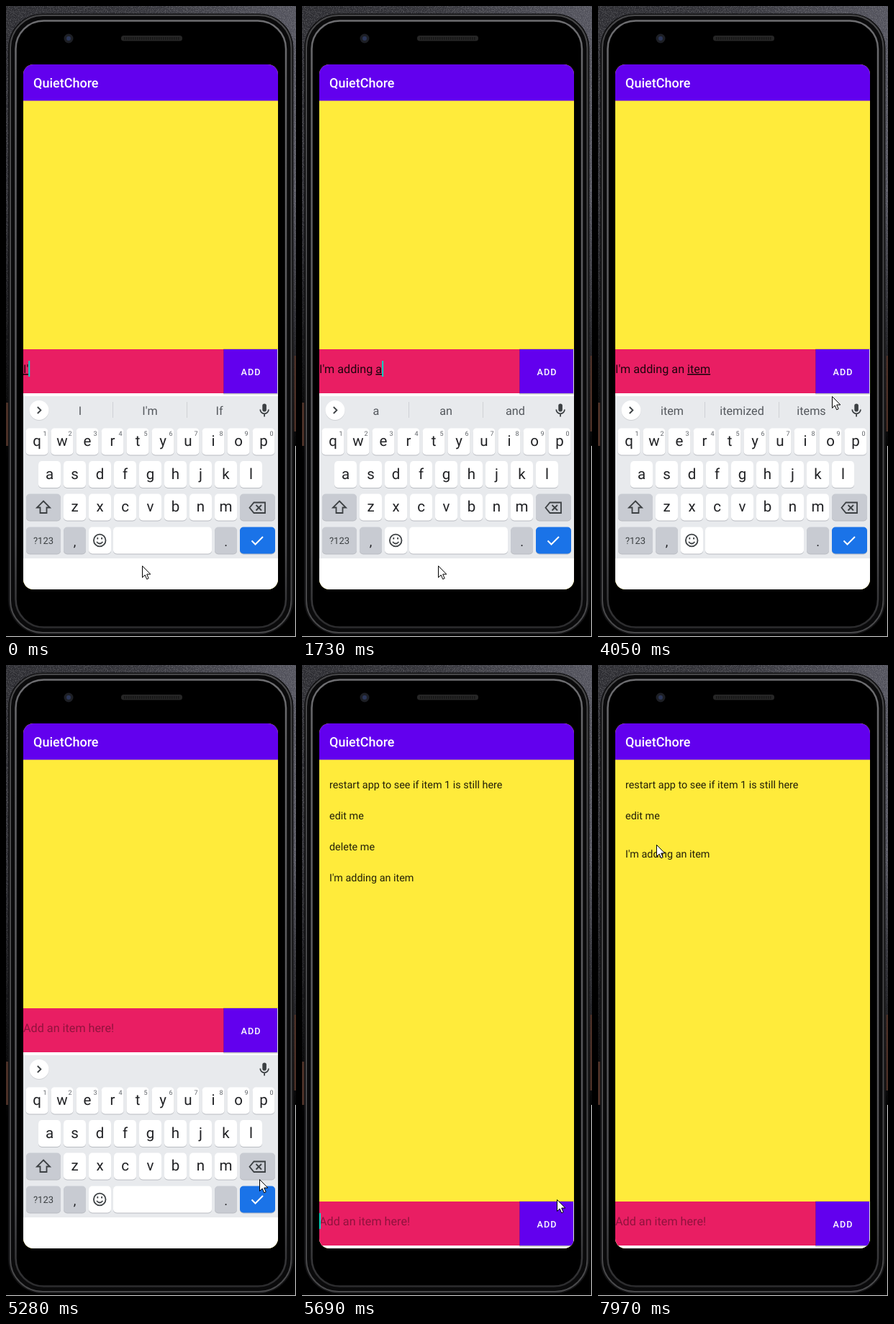
An HTML page that plays this animation: 403x875 px, repeating every 8 s.

```html
<!DOCTYPE html>
<html lang="en">
<head>
<meta charset="utf-8">
<title>To-do app</title>
<style>
  html, body { margin: 0; width: 100%; height: 100%; overflow: hidden; background: #000; }
  svg { display: block; font-family: Roboto, sans-serif; text-rendering: geometricPrecision; }
  text { white-space: pre; }
  .mid { text-anchor: middle; }
  .line { fill: none; stroke: #3c4043; stroke-width: 1.8; }
</style>
</head>
<body>
<svg width="403" height="875" viewBox="0 0 403 875">
  <defs>
    <linearGradient id="desk"><stop stop-color="#2b2b30"/><stop offset=".4" stop-color="#303036"/><stop offset="1" stop-color="#52525c"/></linearGradient>
    <linearGradient id="fade" x2="0" y2="1"><stop offset=".3" stop-opacity="0"/><stop offset=".72"/></linearGradient>
    <linearGradient id="metal" x2="0" y2="1"><stop stop-color="#6e6e71"/><stop offset=".1" stop-color="#646467"/><stop offset=".85" stop-color="#505053"/><stop offset="1" stop-color="#2c2c2e"/></linearGradient>
    <filter id="grain" x="0" y="0" width="1" height="1" color-interpolation-filters="sRGB">
      <feTurbulence type="fractalNoise" baseFrequency=".8" numOctaves="2" seed="4"/>
      <feColorMatrix values="0 0 0 0 1  0 0 0 0 1  0 0 0 0 1  .6 0 0 0 -.26"/>
    </filter>
    <clipPath id="screen"><rect x="24" y="81" width="354" height="728" rx="14"/></clipPath>
  </defs>

  <rect width="403" height="875" fill="url(#desk)"/>
  <rect width="403" height="875" filter="url(#grain)"/>
  <rect width="403" height="875" fill="url(#fade)"/>
  <path d="M1.5 550V610M402 485V590" stroke="#4a2f26" stroke-width="3"/>
  <path d="M402.5 610V874.5H0" fill="none" stroke="#d8d8d8"/>
  <rect x="3.5" y="11" width="395.5" height="860" rx="47" fill="#0a0a0b" stroke="#19191b"/>
  <rect x="6" y="13" width="390.5" height="856" rx="45" fill="none" stroke="#48484a" stroke-width="2"/>
  <rect x="13.5" y="20.5" width="375.5" height="841" rx="39" fill="#000" stroke="url(#metal)" stroke-width="2.5"/>
  <circle cx="87" cy="45" r="6.5" fill="#1d1f25"/>
  <circle cx="87" cy="45" r="3" fill="#2b3658"/>
  <rect x="160" y="41" width="85" height="7.5" rx="3.5" fill="#262626"/>
  <path d="M164 45H242" stroke="#161616" stroke-width="4" stroke-dasharray="1.5 1.5"/>

  <g clip-path="url(#screen)">
    <rect x="24" y="81" width="354" height="728" fill="#ffeb3b"/>
    <rect x="24" y="81" width="354" height="50.4" fill="#6200ee"/>
    <text x="38" y="113" font-size="18" font-weight="500" fill="#fff">QuietChore</text>
    <g id="list" font-size="14.4" fill="#000" fill-opacity=".87"></g>
    <g id="bar">
      <rect x="24" y="476" width="354" height="75" fill="#fff"/>
      <rect x="24" y="476" width="279" height="61" fill="#e91e63"/>
      <rect x="302" y="475.5" width="75.5" height="63" fill-opacity=".25"/>
      <rect x="302.5" y="476" width="74.5" height="61" fill="#6200ee"/>
      <text class="mid" x="340.5" y="511.5" font-size="12.6" font-weight="500" letter-spacing="1.12" fill="#fff">ADD</text>
      <text id="hint" x="24" y="509" font-size="16.2" fill-opacity=".38">Add an item here!</text>
      <text id="field" x="24" y="509" font-size="16.2" fill-opacity=".87"><tspan id="done"></tspan><tspan id="word" text-decoration="underline"></tspan></text>
      <rect id="caret" y="492" width="2" height="22" fill="#03dac5"/>
    </g>
    <g id="keyboard"></g>
  </g>
  <path id="mouse" d="M.5 .5V16.5L4.2 13L6.7 18.8L9.2 17.7L6.7 12H11.8Z" fill="#fff" stroke="#000"/>
</svg>
<script>
const $ = id => document.getElementById(id);
const clamp = v => Math.max(0, Math.min(1, v));
const LOOP = 8000, STEP = 135.2, HIDE = 5433, ROW = 43;

// Time, field text, suggestions
const typing = [
  [0, "I'", "I I'm If"],
  [250, "I'm", "I'm In I'll"],
  [530, "I'm ", "not so sorry"],
  [650, "I'm a", "a and at"],
  [780, "I'm ad", "a and as"],
  [910, "I'm add", "ad adding as"],
  [1050, "I'm addi", "add adding added"],
  [1180, "I'm addin", "addi adding addition"],
  [1310, "I'm adding", "addin adding addict"],
  [1590, "I'm adding ", "a the it"],
  [1730, "I'm adding a", "a an and"],
  [1860, "I'm adding an", "an and any"],
  [2130, "I'm adding an ", "extra item option"],
  [2290, "I'm adding an it", "I it in"],
  [2430, "I'm adding an ite", "it item its"],
  [2570, "I'm adding an item", "ite item itemized"],
  [2720, "I'm adding an item", "item itemized items"],
  [4450, "", ""]
];

// Time, x, y of the pointer
const path = [
  [2950, 189, 776], [3245, 326, 731], [4050, 325, 541], [4320, 341, 500],
  [4800, 341, 500], [5400, 354, 741], [5850, 354, 741], [6450, 110, 226],
  [6760, 89, 262], [6890, 80, 250], [7150, 81, 249]
];

const items = ["restart app to see if item 1 is still here", "edit me", "delete me", "I'm adding an item"];
$("list").innerHTML = items.map((s, i) => `<text x="38" y="${171 + ROW * i}">${s}</text>`).join("");
const rows = $("list").children;

const label = (x, y, size, s, fill = "#202124") =>
  `<text class="mid" x="${x}" y="${y}" font-size="${size}" fill="${fill}">${s}</text>`;
const key = (x, y, w = 31, fill = "#fff") =>
  `<rect x="${x}" y="${y + 1}" width="${w}" height="37" rx="5" fill="#b9bcc2"/>` +
  `<rect x="${x}" y="${y}" width="${w}" height="37" rx="5" fill="${fill}"/>`;
const letters = (s, x, y) => [...s].map((c, i) =>
  key(x + 35 * i, y) + label(x + 15.5 + 35 * i, y + 24.5, 20.5, c)).join("");
const icon = d => `<path class="line" d="${d}"/>`;
const grey = "#c8cbd2";

$("keyboard").innerHTML =
  `<rect x="24" y="541" width="354" height="226" fill="#e8eaed"/><rect x="24" y="766" width="354" height="60" fill="#fff"/>` +
  `<circle cx="46" cy="561.5" r="13.5" fill="#cfd1d5"/><circle cx="46" cy="560.5" r="13.5" fill="#fff"/>` + icon("M43.8 556L48.4 560.5L43.8 565") +
  `<path id="split" d="M148.5 549V571M251.5 549V571" stroke="#cfd1d6"/>` +
  `<g id="words">${[103, 200, 296.5].map(x => label(x, 567, 16.2, "", "#54585d")).join("")}</g>` +
  `<rect x="356.3" y="551.5" width="5.6" height="11" rx="2.8" fill="#3c4043"/>` + icon("M353.3 559.5A5.8 5.8 0 0 0 364.9 559.5M359.1 565V569.5") +
  letters("qwertyuiop", 27.5, 585.5) +
  [..."1234567890"].map((c, i) => label(54 + 35 * i, 596, 9, c, "#5f6368")).join("") +
  letters("asdfghjkl", 45, 631) +
  letters("zxcvbnm", 80, 676.5) +
  key(28, 676.5, 48, grey) + icon("M52 686.5L61 695.5H56.5V703H47.5V695.5H43Z") +
  key(325, 676.5, 49, grey) + icon("M344.5 688.5H360V703H344.5L338.5 695.7ZM347.5 692L355 699.5M355 692L347.5 699.5") +
  key(28, 722.5, 48, grey) + label(52, 746, 13, "?123", "#3c4043") +
  key(80, 722.5, 31, grey) + label(95.5, 749, 18, ",") +
  key(115, 722.5) + icon("M138.5 741A8.3 8.3 0 1 1 121.9 741A8.3 8.3 0 1 1 138.5 741M126 743Q130.2 748 134.4 743M127.3 737V739.5M133.1 737V739.5") +
  key(149, 722.5, 137) +
  key(290, 722.5, 31, grey) + label(305.5, 749, 18, ".") +
  key(325, 722.5, 49, "#1a73e8") + `<path d="M341.5 741.5L346.5 746.5L357 736" fill="none" stroke="#fff" stroke-width="2"/>`;
const words = $("words").children;

function pointerAt(t) {
  const i = path.findIndex(p => p[0] > t);
  if (i < 0) return path[path.length - 1].slice(1);
  if (i === 0) return path[0].slice(1);
  const [t0, x0, y0] = path[i - 1], [t1, x1, y1] = path[i];
  const u = (t - t0) / (t1 - t0), k = u * u * (3 - 2 * u);
  return [x0 + (x1 - x0) * k, y0 + (y1 - y0) * k];
}

// The caret stays lit while typing, then blinks
function caretOn(t) {
  if (t < 2500) return true;
  return (t - (t < 4440 ? 2500 : 4440)) % 1000 < 500;
}

function draw(time) {
  // The screen refreshes in coarse steps
  const t = Math.floor((time + 10) / STEP) * STEP;

  const [, text, hints] = typing.filter(e => e[0] <= time).pop();
  const word = text.match(/\S*$/)[0];
  $("done").textContent = text.slice(0, text.length - word.length);
  $("word").textContent = word;
  $("hint").style.display = text ? "none" : "";
  $("split").style.display = hints ? "" : "none";
  const parts = hints.split(" ");
  for (let i = 0; i < 3; i++) words[i].textContent = parts[i] || "";
  $("caret").setAttribute("x", 24 + (text ? $("field").getComputedTextLength() : 0));
  $("caret").style.display = caretOn(t) ? "" : "none";

  const hide = clamp((t - HIDE) / 200);
  $("keyboard").setAttribute("transform", `translate(0 ${Math.round(205 * hide)})`);
  $("keyboard").setAttribute("opacity", clamp(1 - 1.3 * hide));
  $("bar").setAttribute("transform", `translate(0 ${hide ? 268 : 0})`);
  $("list").style.display = hide ? "" : "none";

  rows[2].setAttribute("opacity", 1 - clamp((t - 7690) / 120));
  const rise = 0.5 - Math.cos(Math.PI * clamp((t - 7809) / 250)) / 2;
  rows[3].setAttribute("transform", `translate(0 ${-ROW * rise})`);

  $("mouse").setAttribute("transform", `translate(${pointerAt(t).map(Math.round).join(" ")})`);
}

function tick() {
  draw(performance.now() % LOOP);
  requestAnimationFrame(tick);
}
tick();
</script>
</body>
</html>
```
